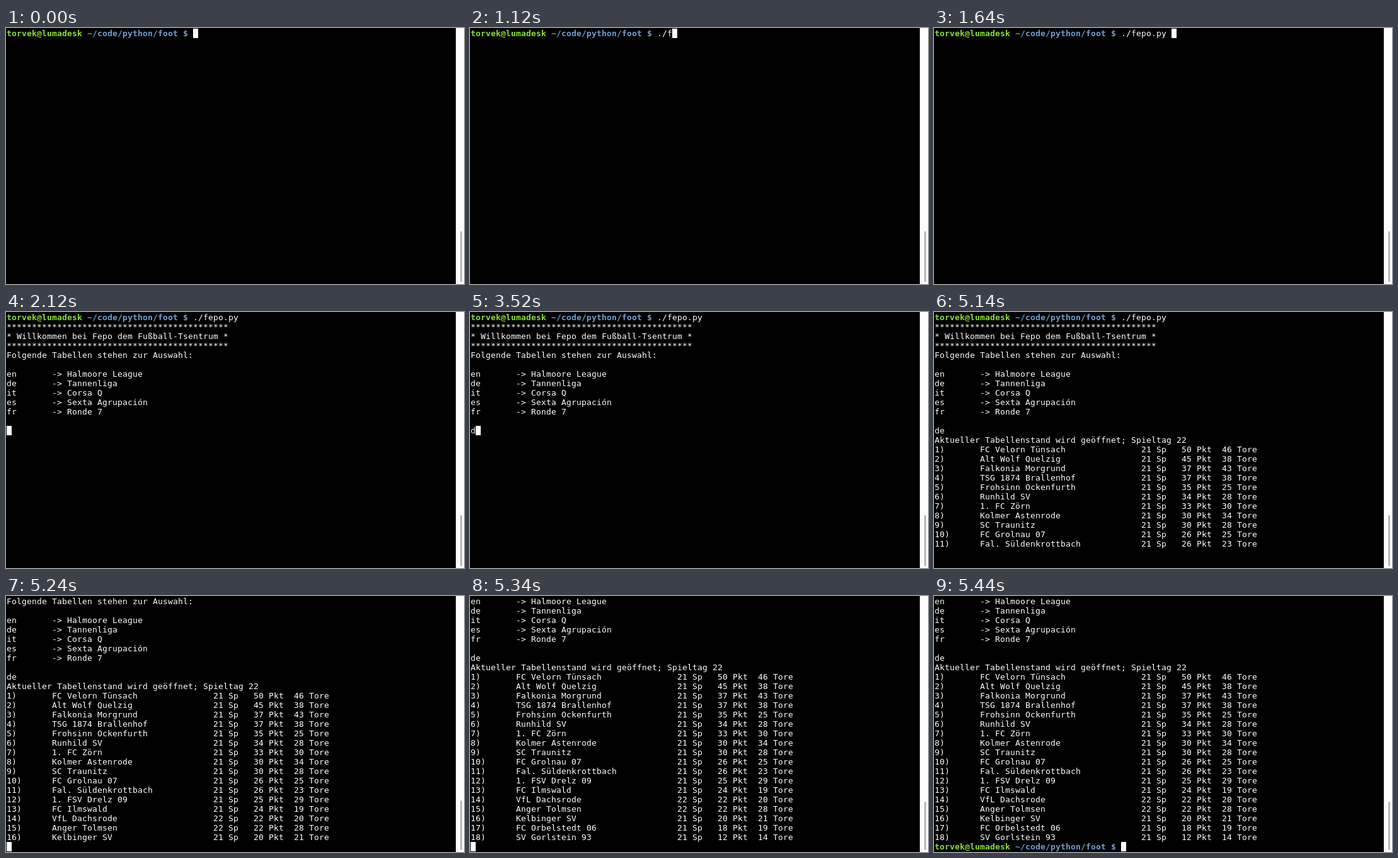
Write an HTML page that moves like this. It is 727x407 px and loops after 8000 ms.

```html
<!DOCTYPE html>
<html lang="de">
<head>
<meta charset="utf-8">
<title>Terminal</title>
<style>
  html, body { margin: 0; width: 100%; height: 100%; overflow: hidden; background: #000; }
  svg { display: block; width: 727px; height: 407px; }
  text {
    font: 13px "DejaVu Sans Mono", monospace;
    font-variant-ligatures: none;
    white-space: pre;
    fill: #fff;
  }
  .user { font-weight: bold; fill: #8ae234; }
  .path { font-weight: bold; fill: #729fcf; }
</style>
</head>
<body>
<svg viewBox="0 0 727 407" xmlns="http://www.w3.org/2000/svg">
  <rect width="727" height="407" fill="#000"/>
  <g id="screen"></g>
  <rect id="cursor" width="8" height="15" fill="#fff"/>
  <rect x="714" width="13" height="407" fill="#fcfcfc"/>
  <rect id="thumb" x="721" width="3" rx="1.5" fill="#b5b9b8"/>
</svg>
<script>
const LOOP = 8000, CELL_W = 8, CELL_H = 15, PAD = 1, BASE = 12, ROWS = 27;
const USER = "torvek@lumadesk", PATH = "~/code/python/foot $";
const PROMPT_LEN = USER.length + PATH.length + 2;
const COMMAND = "./fepo.py ";

const leagues = [
  ["en", "Halmoore League"],
  ["de", "Tannenliga"],
  ["it", "Corsa Q"],
  ["es", "Sexta Agrupación"],
  ["fr", "Ronde 7"]
];

// name, matches, points, goals
const teams = [
  ["FC Velorn Tünsach", 21, 50, 46],
  ["Alt Wolf Quelzig", 21, 45, 38],
  ["Falkonia Morgrund", 21, 37, 43],
  ["TSG 1874 Brallenhof", 21, 37, 38],
  ["Frohsinn Ockenfurth", 21, 35, 25],
  ["Runhild SV", 21, 34, 28],
  ["1. FC Zörn", 21, 33, 30],
  ["Kolmer Astenrode", 21, 30, 34],
  ["SC Traunitz", 21, 30, 28],
  ["FC Grolnau 07", 21, 26, 25],
  ["Fal. Süldenkrottbach", 21, 26, 23],
  ["1. FSV Drelz 09", 21, 25, 29],
  ["FC Ilmswald", 21, 24, 19],
  ["VfL Dachsrode", 22, 22, 20],
  ["Anger Tolmsen", 22, 22, 28],
  ["Kelbinger SV", 21, 20, 21],
  ["FC Orbelstedt 06", 21, 18, 19],
  ["SV Gorlstein 93", 21, 12, 14]
];

const stars = "*".repeat(44);
const menu = [
  stars,
  "* Willkommen bei Fepo dem Fußball-Tsentrum *",
  stars,
  "Folgende Tabellen stehen zur Auswahl:",
  "",
  ...leagues.map(([code, name]) => code.padEnd(9) + "-> " + name),
  ""
];
const table = teams.map(([name, sp, pkt, tore], i) =>
  `${i + 1})`.padEnd(9) + name.padEnd(32) + `${sp} Sp   ${pkt} Pkt  ${tore} Tore`);

// at: start time, typed: command characters, the rest is off until set
const steps = [
  { at: 0, typed: 0 },
  { at: 500, typed: 1 },
  { at: 820, typed: 2 },
  { at: 1120, typed: 3 },
  { at: 1220, typed: 4 },
  { at: 1330, typed: 5 },
  { at: 1640, typed: 10 },
  { at: 2030, typed: 10, run: true },
  { at: 2120, menu: true, answer: "" },
  { at: 3520, menu: true, answer: "d" },
  { at: 3700, menu: true, answer: "de", hidden: true },
  { at: 5140, menu: true, answer: "de", places: 11, hidden: true },
  { at: 5240, menu: true, answer: "de", places: 16 },
  { at: 5340, menu: true, answer: "de", places: 18 },
  { at: 5440, menu: true, answer: "de", places: 18, done: true }
];

const $ = id => document.getElementById(id);
const screen = $("screen"), cursor = $("cursor"), thumb = $("thumb");

function put(row, col, str, cls) {
  const el = document.createElementNS("http://www.w3.org/2000/svg", "text");
  el.setAttribute("x", [...str].map((_, i) => PAD + (col + i) * CELL_W).join(" "));
  el.setAttribute("y", PAD + row * CELL_H + BASE);
  if (cls) el.setAttribute("class", cls);
  el.textContent = str;
  screen.append(el);
}

function putPrompt(row, command) {
  put(row, 0, USER, "user");
  put(row, USER.length + 1, PATH, "path");
  if (command) put(row, PROMPT_LEN, command);
}

function render(s) {
  const lines = [];
  let row = 0, col = PROMPT_LEN + s.typed;
  if (s.run) {
    row = 1;
    col = 0;
  }
  if (s.menu) {
    lines.push(...menu, s.answer);
    row = lines.length;
    col = s.answer.length;
  }
  if (s.places) {
    lines.push("Aktueller Tabellenstand wird geöffnet; Spieltag 22", ...table.slice(0, s.places));
    row = lines.length + 1;
    col = s.done ? PROMPT_LEN : 0;
  }

  const top = Math.max(0, row - ROWS + 1);
  screen.replaceChildren();
  if (top === 0) putPrompt(0, COMMAND.slice(0, s.typed));
  lines.forEach((line, i) => {
    if (line && i + 1 >= top) put(i + 1 - top, 0, line);
  });
  if (s.done) putPrompt(row - top);

  cursor.setAttribute("x", PAD + col * CELL_W);
  cursor.setAttribute("y", PAD + (row - top) * CELL_H);
  cursor.setAttribute("visibility", s.hidden ? "hidden" : "visible");

  const y = 323 + Math.round(top * 0.6);
  thumb.setAttribute("y", y);
  thumb.setAttribute("height", 404 - y);
}

let shown;
const start = performance.now();
function tick(now) {
  const t = Math.max(0, now - start) % LOOP;
  const step = steps.findLast(s => s.at <= t);
  if (step !== shown) render(shown = step);
  requestAnimationFrame(tick);
}
tick(start);
</script>
</body>
</html>
```
